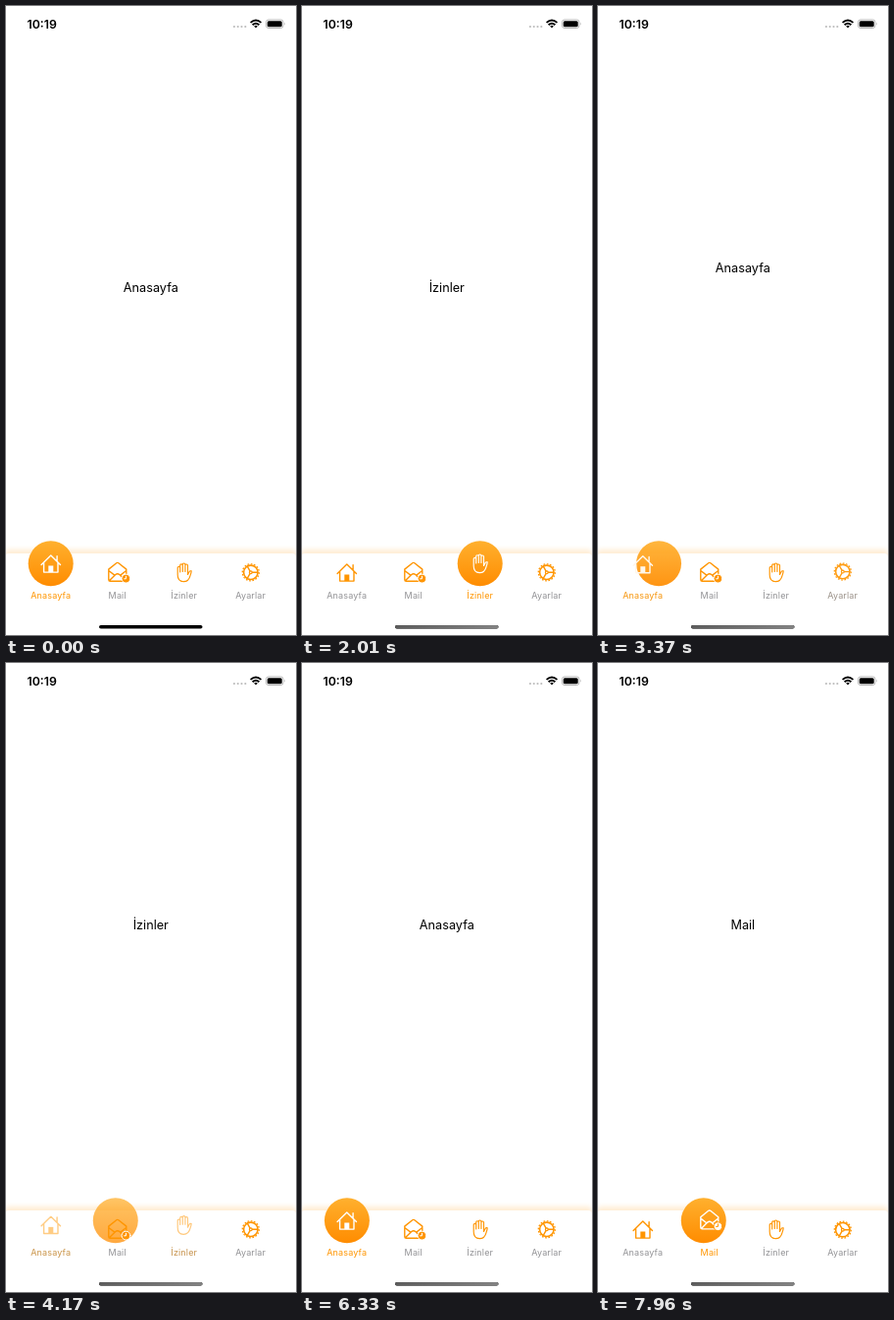
An HTML page that plays this animation: 296 by 640 pixels, repeating every 8 s.

```html
<!DOCTYPE html>
<html lang="tr">
<head>
<meta charset="utf-8">
<title>Tab bar</title>
<style>
html, body { margin: 0; width: 100%; height: 100%; overflow: hidden; background: #fff; }
svg { display: block; width: 100%; height: 100%; font-family: Inter, Roboto, sans-serif; }
#bar { fill: #fff; filter: drop-shadow(0 -4px 2.5px rgba(255, 150, 0, .17)); }
#title { font-size: 12.7px; text-anchor: middle; }
#clock { font-size: 12.3px; font-weight: 600; }
.label { font-size: 9px; letter-spacing: .15px; text-anchor: middle; }
.icon { fill: none; stroke: currentColor; stroke-width: 1.4; stroke-linecap: round; stroke-linejoin: round; }
.solid { fill: currentColor; stroke: none; }
</style>
</head>
<body>
<svg viewBox="0 0 296 640">
  <defs>
    <linearGradient id="orange" x2="0" y2="1">
      <stop stop-color="#ffb02e"/><stop offset="1" stop-color="#ff8c00"/>
    </linearGradient>
    <linearGradient id="grey">
      <stop stop-color="#5c5c5c"/><stop offset="1" stop-color="#828282"/>
    </linearGradient>
  </defs>

  <text id="clock" x="21.5" y="22.7">10:19</text>
  <g fill="#bdbdbd">
    <circle cx="232.9" cy="21" r="1.1"/><circle cx="236.7" cy="21" r="1.1"/>
    <circle cx="240.5" cy="21" r="1.1"/><circle cx="244.3" cy="21" r="1.1"/>
  </g>
  <g fill="none" stroke="#000" stroke-width="1.9">
    <path d="M249.6 16.9Q255 12.1 260.4 16.9M251.6 19.2Q255 16.2 258.4 19.2"/>
    <path d="M255 22.4L253.2 20.5Q255 19.1 256.8 20.5Z" fill="#000" stroke="none"/>
  </g>
  <rect x="265.4" y="13.9" width="17.6" height="8.6" rx="2.6" fill="none" stroke="#a8a8a8" stroke-width=".8"/>
  <rect x="266.7" y="15.2" width="15" height="6" rx="1.5"/>
  <path d="M284 16.8q1.3 1.4 0 2.8z" fill="#a8a8a8"/>

  <text id="title" x="147.8"></text>
  <rect id="bar" x="-1" y="557" width="297" height="110" rx="4"/>
  <circle id="ball" cy="567.3" r="23" fill="url(#orange)"/>

  <g class="icon">
    <path d="M-9.7 1.2L0 -8.3L9.7 1.2M-7.2 -.8V8.8H7.2V-.8M6.3 -2.6V-7.6"/>
    <path class="solid" d="M-2.5 2.2h5v6.6h-5z"/>
  </g>
  <g class="icon">
    <path d="M-9 -3.2L-1 -9.6Q0 -10.3 1 -9.6L9 -3.2V7.4Q9 9 7.4 9H-7.4Q-9 9 -9 7.4ZM-9 -1.8L-3 2.8M9 -1.8L3 2.8M-8.4 8.5L-2 2.2Q0 .6 2 2.2L8.4 8.5"/>
    <circle cx="8.7" cy="6.3" r="4.4" style="fill:currentColor;stroke:var(--back)" stroke-width="1"/>
    <path d="M8.7 4V6.5H6.8" style="stroke:var(--back)" stroke-width="1"/>
  </g>
  <g class="icon">
    <path stroke-width="1.15" d="M-6.6 2.5V-4.6a1.25 1.25 0 0 1 2.5 0V-.4M-4.1 -4.6V-7.2a1.3 1.3 0 0 1 2.6 0V-.8M-1.5 -7.2V-8a1.3 1.3 0 0 1 2.6 0V-.8M1.1 -7a1.3 1.3 0 0 1 2.6 0V2.2L5.2 -.6Q6 -2 7.4 -1.4Q7.4 -.5 6.3 3Q4.8 9.4 -.6 9.4Q-6.6 9.2 -6.6 2.5"/>
  </g>
  <g class="icon">
    <circle r="7.2" stroke-width="1.6"/>
    <circle r="8.5" stroke-width="1.3" stroke-linecap="butt" pathLength="32" stroke-dasharray="1 1"/>
    <circle r="1.4" stroke-width="1.2"/>
    <path d="M1.6 0H7M-.8 -1.4L-3.5 -6.1M-.8 1.4L-3.5 6.1"/>
  </g>

  <rect id="home" x="95" y="630" width="105.5" height="3.6" rx="1.8"/>
  <rect id="homeGrey" x="95" y="630" width="105.5" height="3.6" rx="1.8" fill="url(#grey)"/>
</svg>
<script>
const LOOP = 8000;
const NAMES = ['Anasayfa', 'Mail', 'İzinler', 'Ayarlar'];
const ORANGE = [255, 149, 0], WHITE = [255, 255, 255], GREY = [146, 146, 149];

// [start time, selected tab]
const TAPS = [[-2000, 0], [450, 1], [1235, 2], [2049, 3], [3000, 0], [4019, 2], [5175, 0], [6580, 3], [7480, 1]];

// Screen refreshes: [first, last, count]
const RUNS = [[0, 0, 1], [500, 1280, 8], [1380, 2110, 8], [2230, 2850, 7], [3050, 3840, 8],
  [3940, 4710, 8], [4830, 4830, 1], [5060, 5800, 8], [5900, 6000, 2], [6630, 7410, 8], [7520, 7960, 5]];

const $ = id => document.getElementById(id);
const tabX = i => 45.7 + 68 * i;
const clamp = v => Math.max(0, Math.min(1, v));
const mix = (a, b, p) => `rgb(${a.map((v, i) => Math.round(v + (b[i] - v) * p))})`;
const lastBefore = (list, t) => list.filter(e => e[0] <= t).pop();

const icons = [...document.querySelectorAll('.icon')];
const labels = NAMES.map((name, i) => {
  const el = document.createElementNS('http://www.w3.org/2000/svg', 'text');
  el.setAttribute('class', 'label');
  el.setAttribute('x', tabX(i));
  el.setAttribute('y', 603);
  el.textContent = name;
  $('home').before(el);
  return el;
});

// Damped spring, ratio 0.7, settling in about a second
function spring(ms) {
  const z = 0.7, w = 9.9, d = Math.sqrt(1 - z * z), s = ms / 1000;
  return 1 - Math.exp(-z * w * s) * (Math.cos(w * d * s) + z / d * Math.sin(w * d * s));
}

function refreshTime(t) {
  const [first, last, count] = lastBefore(RUNS, t);
  if (count < 2) return first;
  const step = (last - first) / (count - 1);
  return first + step * Math.min(count - 1, Math.floor((t - first) / step + 1e-6));
}

function draw(now) {
  const t = refreshTime(now % LOOP);
  const tap = lastBefore(TAPS, t);
  const to = tap[1], from = (TAPS[TAPS.indexOf(tap) - 1] || tap)[1];
  const p = spring(t - tap[0]), q = clamp(p);

  $('title').textContent = NAMES[to];
  $('title').setAttribute('y', t < 3000 ? 290.8 : 271.3);
  $('ball').setAttribute('cx', tabX(from) + (tabX(to) - tabX(from)) * p);
  $('ball').setAttribute('opacity', 1 - q * (1 - q));
  $('homeGrey').setAttribute('opacity', clamp((t - 400) / 400));

  icons.forEach((icon, i) => {
    const on = i === to ? (from === to ? 1 : p) : i === from ? 1 - p : 0;
    const c = clamp(on);
    icon.setAttribute('transform', `translate(${tabX(i) + .1} ${576.3 - 9 * on})`);
    icon.style.color = mix(ORANGE, WHITE, c);
    icon.style.setProperty('--back', mix(WHITE, ORANGE, c));
    labels[i].style.fill = mix(GREY, ORANGE, c);
  });
}

const begin = performance.now();
function loop() {
  draw(performance.now() - begin);
  requestAnimationFrame(loop);
}
loop();
</script>
</body>
</html>
```
